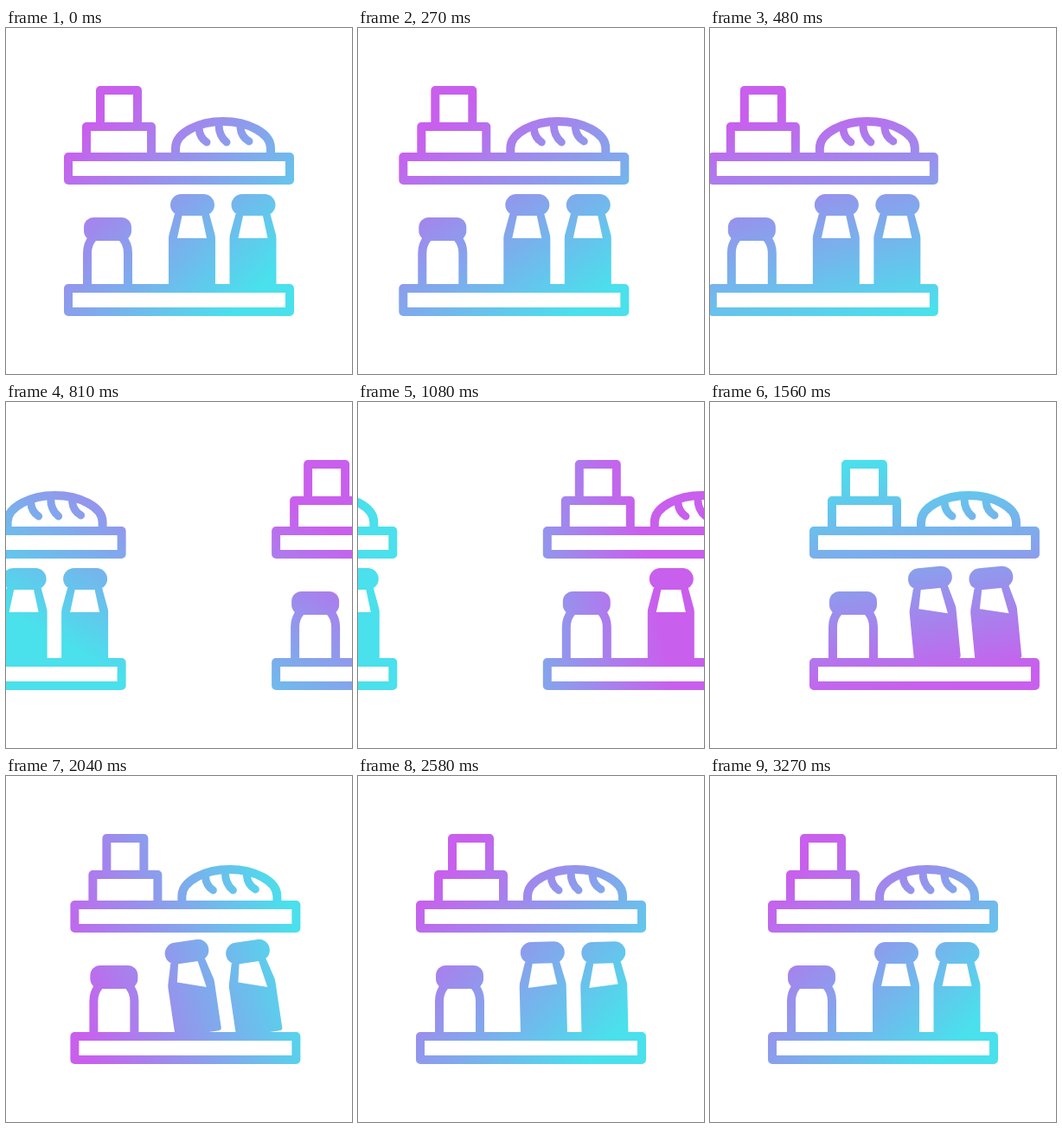
An HTML page that plays this animation: 400 by 400 pixels, repeating every 5330 ms.

```html
<!DOCTYPE html>
<html lang="en">
<head>
<meta charset="utf-8">
<title>Grocery shelves</title>
<style>
  html, body { margin: 0; width: 100%; height: 100%; overflow: hidden; background: #fff; }
  svg { display: block; width: 100%; height: 100%; }
</style>
</head>
<body>
<svg viewBox="0 0 400 400">
  <defs>
    <linearGradient id="tint" gradientUnits="userSpaceOnUse" x1="65" y1="200" x2="335" y2="200">
      <stop offset="0" stop-color="#c95fed"/>
      <stop offset="1" stop-color="#4ae0ec"/>
    </linearGradient>

    <g id="bottle">
      <path fill="#fff" d="M188 297V243Q188 240 189 237L195 215H235L241 237Q242 240 242 243V297Q242 300 239 300H191Q188 300 188 297Z"/>
      <path id="neck" fill="#000"/>
      <rect x="190" y="192" width="51" height="25" rx="12.5" fill="#fff"/>
    </g>

    <g id="shelves" fill="none" stroke="#fff" stroke-width="10" stroke-linejoin="round" stroke-linecap="round">
      <rect x="109" y="72" width="43" height="42"/>
      <rect x="93" y="114" width="75" height="35"/>
      <path d="M196 148V139C196 121 223 108 251 108S306 121 306 139V148"/>
      <path stroke-width="9" d="M223 116Q224 127 232 132M246 111Q246 125 255 132M271 115Q272 126 281 131"/>
      <rect x="72" y="149" width="256" height="27"/>

      <path d="M94 300V260Q94 250 100 243M141 300V260Q141 250 135 243"/>
      <rect x="90" y="219" width="55" height="27" rx="11.5" fill="#fff" stroke="none"/>
      <g stroke="none">
        <g class="tilt"><use href="#bottle"/></g>
        <g transform="translate(70.5 0)"><g class="tilt"><use href="#bottle"/></g></g>
      </g>
      <rect x="72" y="301" width="256" height="27"/>
    </g>

    <mask id="scene" maskUnits="userSpaceOnUse" x="0" y="0" width="400" height="400">
      <use id="leaving" href="#shelves"/>
      <use id="arriving" href="#shelves"/>
    </mask>
  </defs>
  <rect width="400" height="400" fill="url(#tint)" mask="url(#scene)"/>
</svg>
<script>
  const LOOP = 5330;
  const SPACING = 434.5;
  const SLIDE_TIME = 2400;
  const SPIN_TIME = 2750;
  const TILT = [[1100, 0], [1900, -9], [2800, 0]];
  const SLOSH = [[1100, 0], [1700, 4.8], [2040, 5.2], [2700, -2.5], [3270, 0]];

  const byId = id => document.getElementById(id);
  const tint = byId('tint'), neck = byId('neck');
  const leaving = byId('leaving'), arriving = byId('arriving');
  const tilted = document.querySelectorAll('.tilt');

  const clamp = x => Math.min(1, Math.max(0, x));
  const smooth = x => x * x * (3 - 2 * x);

  // Cubic bezier easing with flat ends: control points (a, 0) and (b, 1).
  function bezier(x, a, b) {
    let low = 0, high = 1;
    for (let i = 0; i < 30; i++) {
      const s = (low + high) / 2, r = 1 - s;
      if (3 * a * s * r * r + 3 * b * s * s * r + s * s * s < x) low = s;
      else high = s;
    }
    return smooth(high);
  }

  function track(keys, t) {
    if (t <= keys[0][0]) return keys[0][1];
    for (let i = 1; i < keys.length; i++) {
      const [t0, v0] = keys[i - 1], [t1, v1] = keys[i];
      if (t < t1) return v0 + (v1 - v0) * smooth((t - t0) / (t1 - t0));
    }
    return keys[keys.length - 1][1];
  }

  function draw(t) {
    const slide = t >= SLIDE_TIME ? 1 : bezier(t / SLIDE_TIME, 0.334, 0.3);
    const x = -SPACING * slide;
    leaving.setAttribute('transform', `translate(${x} 0)`);
    arriving.setAttribute('transform', `translate(${x + SPACING} 0)`);

    const angle = 45 + 360 * smooth(clamp(t / SPIN_TIME));
    tint.setAttribute('gradientTransform', `rotate(${angle} 200 200)`);

    const tilt = track(TILT, t);
    tilted.forEach(g => g.setAttribute('transform', `rotate(${tilt} 200 298)`));

    // The milk surface rises on one side as it falls on the other.
    const k = track(SLOSH, t);
    const left = 198 + 0.25 * Math.max(0, k);
    const right = 232 + 0.25 * Math.min(0, k);
    neck.setAttribute('d', `M204 215H226L${right} ${243 + k}L${left} ${243 - k}Z`);
  }

  const start = performance.now();
  function tick() {
    draw((performance.now() - start) % LOOP);
    requestAnimationFrame(tick);
  }
  tick();
</script>
</body>
</html>
```
